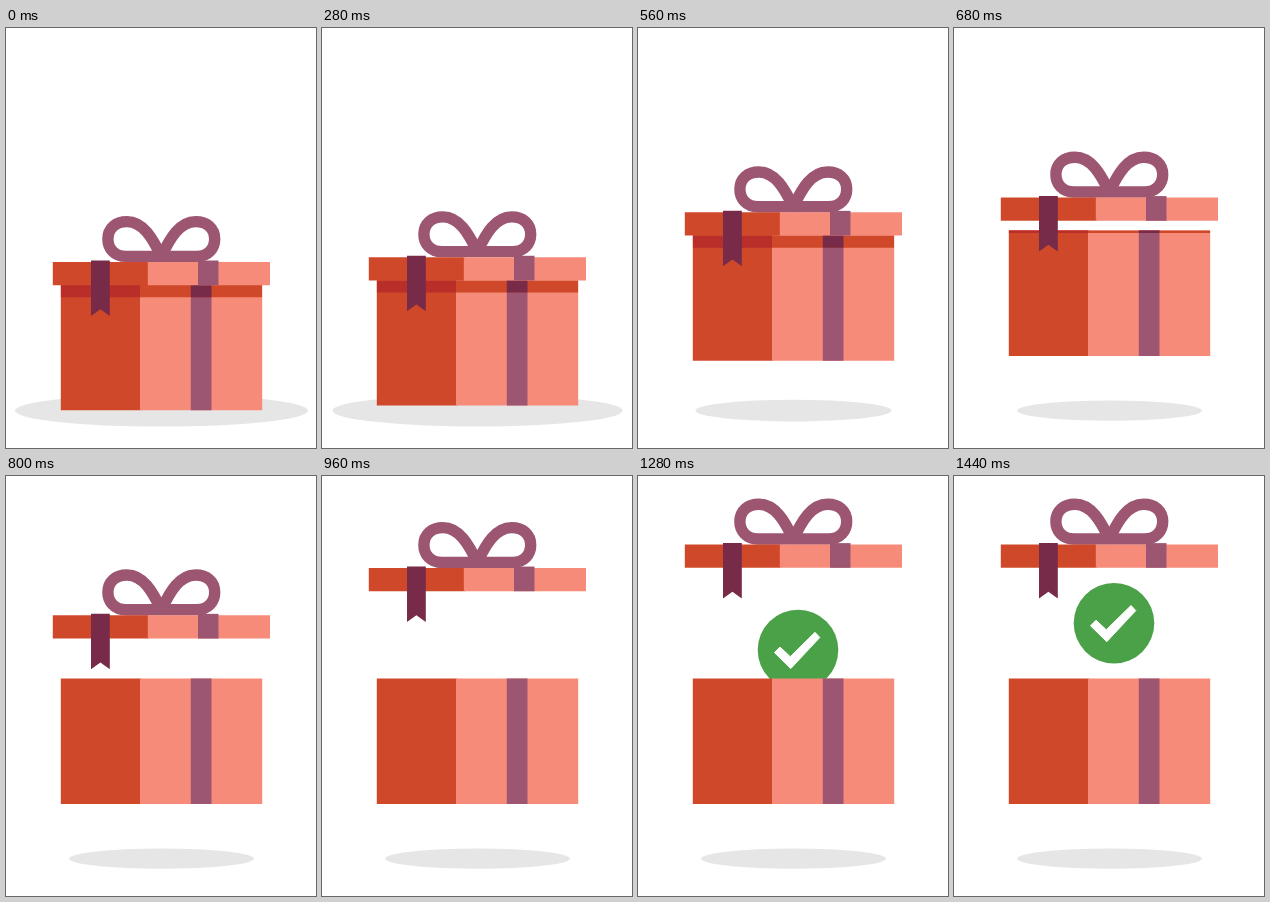
Animation of 310x420 px, one loop 2240 ms. Source, as an HTML page:

```html
<!DOCTYPE html>
<html lang="en">
<head>
<meta charset="utf-8">
<title>Gift box</title>
<style>
  html, body { margin: 0; width: 100%; height: 100%; overflow: hidden; background: #fff; }
  svg { display: block; }
  .dark { fill: #cf482a; }
  .light { fill: #f58b78; }
  .shade { fill: #b92e29; }
  .ribbon { fill: #9c5671; }
  .tail { fill: #772b49; }
</style>
</head>
<body>
<svg width="310" height="420" viewBox="0 0 310 420">
  <ellipse id="shadow" cx="155.5" cy="382.6" fill="#e6e6e6"/>

  <g id="badge">
    <circle cx="160" cy="147.2" r="40.3" fill="#4aa147"/>
    <path d="M136.5 149.8 142 144.2 152.3 153.8 177 129.5 181.8 134.6 152.8 165.7Z"
          fill="#fff" stroke="#fff" stroke-linejoin="round"/>
  </g>

  <g id="box">
    <path class="dark" d="M54.8 257H135V382.3H54.8Z"/>
    <path class="light" d="M134 257H256.2V382.3H134Z"/>
    <path class="ribbon" d="M184.8 257H205.5V382.3H184.8Z"/>
    <!-- the lid's cast shadow, clipped to the box front -->
    <svg x="54.8" y="257" width="201.4" height="125">
      <g id="cast">
        <path class="dark" d="M0 0H201.4V12.3H0Z"/>
        <path class="shade" d="M0 0H79.2V12.3H0Z"/>
        <path class="tail" d="M130 0H150.7V12.3H130Z"/>
      </g>
    </svg>
  </g>

  <g id="lid">
    <g fill="none" stroke="#9c5671" stroke-width="11.4">
      <path id="loop" d="M155.3 228.4H120C108 228.4 101.9 220 101.9 211C101.9 200 110 193.6 121 193.6C137 193.6 146.5 210 155.3 228.4Z" stroke-linejoin="bevel"/>
      <use href="#loop" transform="translate(310.6) scale(-1 1)"/>
    </g>
    <path class="dark" d="M46.8 234H143V257.2H46.8Z"/>
    <path class="light" d="M141.8 234H264V257.2H141.8Z"/>
    <path class="ribbon" d="M192 232.5H212.5V257.2H192Z"/>
    <path class="tail" d="M85 232.5H103.8V288L94.4 281.2 85 288Z"/>
  </g>
</svg>
<script>
  const LOOP = 2240, STEP = 40;
  const RISE = 54.4, LIFT = 111, POP = 127;
  const $ = id => document.getElementById(id);
  const shadow = $('shadow'), badge = $('badge'), box = $('box'), cast = $('cast'), lid = $('lid');

  // Smooth ease-in-out progress between two times
  function ease(t, start, end) {
    const p = Math.min(1, Math.max(0, (t - start) / (end - start)));
    return p * p * (3 - 2 * p);
  }

  const moveY = (el, y) => el.setAttribute('transform', `translate(0 ${y})`);

  function draw(now) {
    const t = Math.floor((now % LOOP) / STEP) * STEP;
    const rise = RISE * ease(t, 200, 640);
    const lift = LIFT * ease(t, 580, 1120);
    const shrink = ease(t, 240, 640);

    moveY(box, -rise);
    moveY(cast, -lift);
    moveY(lid, -rise - lift);
    moveY(badge, POP * (1 - ease(t, 900, 1440)));
    badge.style.visibility = t < 900 ? 'hidden' : 'visible';
    shadow.setAttribute('rx', 146.5 - 54 * shrink);
    shadow.setAttribute('ry', 16 - 5.8 * shrink);
  }

  const origin = performance.now();
  function tick() {
    draw(performance.now() - origin);
    requestAnimationFrame(tick);
  }
  tick();
</script>
</body>
</html>
```
